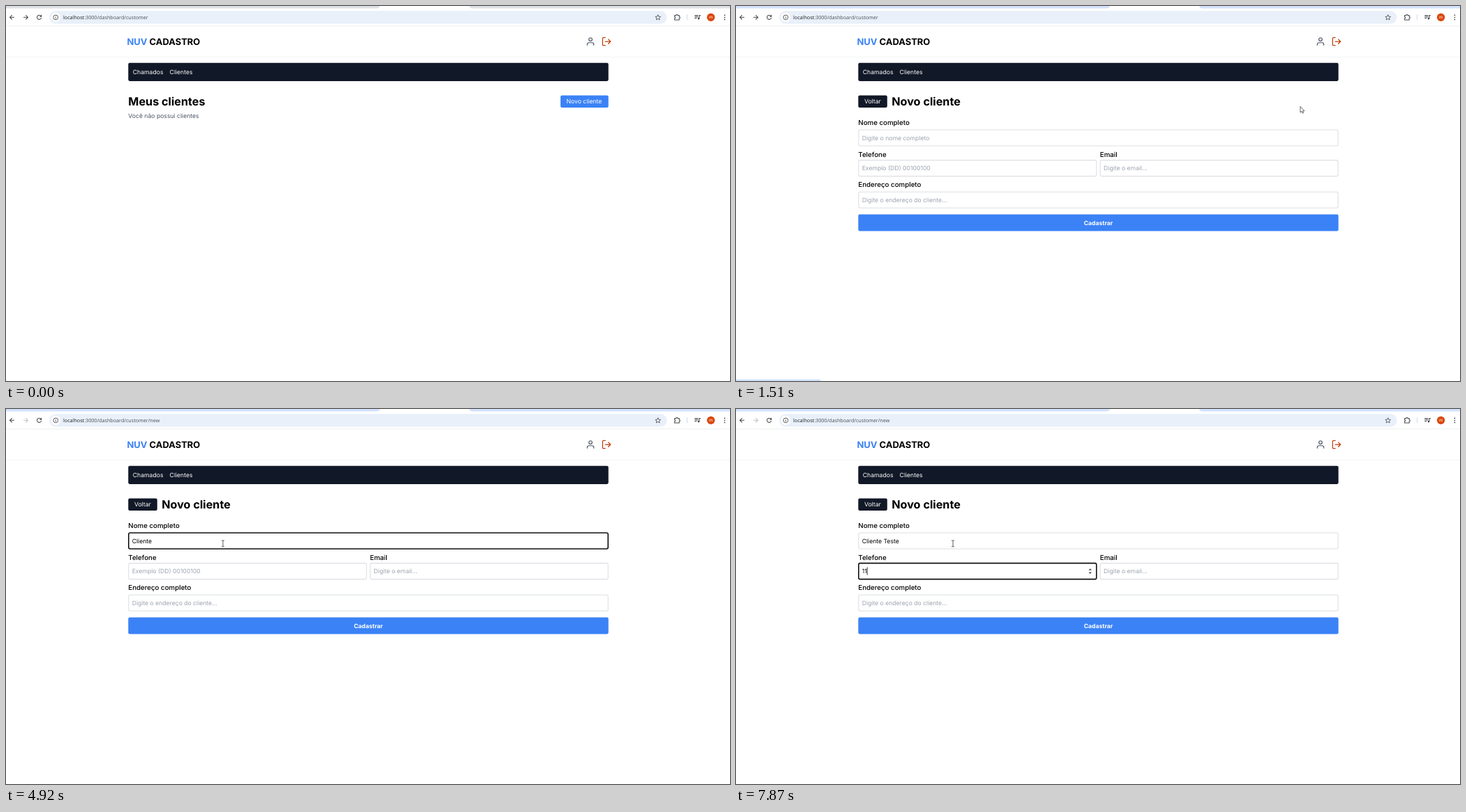
Write an HTML page that moves like this. It is 1038x539 px and loops after 8000 ms.

```html
<!DOCTYPE html>
<html lang="pt-BR">
<head>
<meta charset="utf-8">
<title>Novo cliente</title>
<style>
  html, body { margin: 0; width: 100%; height: 100%; overflow: hidden; background: #fff; }
  svg { display: block; width: 1038px; height: 539px; }
  text { font: 8.65px Inter, sans-serif; white-space: pre; text-rendering: geometricPrecision; }
  .brand { font-size: 12.97px; font-weight: 700; }
  .title { font-size: 16.22px; font-weight: 700; }
  .label { font-size: 9.73px; font-weight: 500; }
  .url { font: 7.19px "Open Sans", sans-serif; fill: #4a4d51; }
  .hint { fill: #9ca3af; }
  .light { fill: #fff; }
  .dark { fill: #111827; }
  .blue { fill: #3b82f6; }
  .chrome { fill: #dee1e6; }
  .active .chrome { fill: #d3e3fd; }
  .field { fill: #fff; stroke: #dcdfe4; stroke-width: 1.08; }
  .field.focus { stroke: #101010; stroke-width: 1.6; }
  .line { fill: none; stroke: #45484c; stroke-width: 1.05; }
  .feather { fill: none; stroke-width: 2; stroke-linecap: round; stroke-linejoin: round; }
  .pointer { fill: #fff; stroke: #25282c; stroke-width: .7; stroke-linejoin: round; }
  .off { display: none; }
</style>
</head>
<body>
<svg id="stage" viewBox="0 0 1038 539">
  <!-- browser bar -->
  <path class="chrome" d="M0 0H536Q535 3.6 531 3.6H0Z"/>
  <path class="chrome" d="M664 0Q665 3.6 669 3.6H1038V0Z"/>
  <rect x="62" y="7" width="885.5" height="18.6" rx="9.3" fill="#e9f0fa"/>
  <circle cx="71.3" cy="16.3" r="6.8" fill="#fff"/>
  <g class="line">
    <path d="M12 16.2H5.6M8.7 13.1L5.6 16.2L8.7 19.3"/>
    <path id="forward" d="M25 16.2H31.4M28.3 13.1L31.4 16.2L28.3 19.3"/>
    <path d="M50.2 14.6A3.1 3.1 0 1 0 50.6 17M50.7 12.8V15.2H48.3"/>
    <circle cx="71.3" cy="16.3" r="3.4" stroke-width=".9"/>
    <path d="M71.3 15.9V18.2M71.3 14.3V15.1" stroke-width=".9"/>
    <path d="M934.7 12.6L935.8 15.1L938.5 15.4L936.5 17.2L937.1 19.8L934.7 18.4L932.3 19.8L932.9 17.2L930.9 15.4L933.6 15.1Z" stroke-width=".85"/>
    <path d="M958.6 13.4H960.7A1.2 1.2 0 0 1 963.1 13.4H965.2V15.4A1.2 1.2 0 0 1 965.2 17.8V20H958.6V17.8A1.2 1.2 0 0 0 958.6 15.4Z"/>
    <path d="M987.3 13.6H992.3M987.3 15.7H992.3M987.3 17.8H990.2M993.9 18V13.6H995.8"/>
    <path d="M976.5 12.2V20.2" stroke="#cddcf3"/>
  </g>
  <circle cx="993" cy="18.1" r="1.3" fill="#45484c"/>
  <circle cx="1010.6" cy="16.2" r="5.7" fill="#d9480f"/>
  <text x="1010.6" y="18.2" text-anchor="middle" fill="#fff" style="font-size:6px">m</text>
  <g fill="#45484c">
    <circle cx="1030.4" cy="13.2" r=".85"/><circle cx="1030.4" cy="16.3" r=".85"/><circle cx="1030.4" cy="19.4" r=".85"/>
  </g>
  <text class="url" x="82" y="18.9"><tspan fill="#1f1f1f">localhost</tspan>:3000/dashboard/customer<tspan id="urlTail">/new</tspan></text>
  <path d="M0 28.7H1038" stroke="#e8eaed" stroke-width=".8"/>

  <!-- page header -->
  <text class="brand" x="173.4" y="55.6"><tspan class="blue">NUV</tspan> CADASTRO</text>
  <g class="feather" stroke="#4b5563" transform="translate(831 44) scale(.585)">
    <path d="M20 21v-2a4 4 0 0 0-4-4H8a4 4 0 0 0-4 4v2"/><circle cx="12" cy="7" r="4"/>
  </g>
  <g class="feather" stroke="#c2410c" transform="translate(853.5 43.5) scale(.63)">
    <path d="M9 21H5a2 2 0 0 1-2-2V5a2 2 0 0 1 2-2h4M16 17l5-5-5-5M21 12H9"/>
  </g>
  <path d="M0 73.3H1038" stroke="#f1f2f4" stroke-width=".9"/>
  <rect class="dark" x="175.3" y="81.7" width="688.4" height="26.2" rx="2.1"/>
  <text class="light" x="181.8" y="98.1">Chamados</text>
  <text class="light" x="234.6" y="98.1">Clientes</text>

  <!-- customer list -->
  <g id="list">
    <text class="title" x="175.3" y="143.3">Meus clientes</text>
    <text x="175.3" y="161.1" fill="#4b5563">Você não possui clientes</text>
    <rect class="blue" x="795" y="128.4" width="68.7" height="17.6" rx="2.1"/>
    <text class="light" x="803.6" y="140.4">Novo cliente</text>
  </g>

  <!-- new customer form -->
  <g id="form">
    <rect class="dark" x="175.3" y="128.4" width="41.5" height="17.6" rx="2.1"/>
    <text class="light" x="183.9" y="140.4">Voltar</text>
    <text class="title" x="223.2" y="143.3">Novo cliente</text>
    <text class="label" x="175.3" y="171">Nome completo</text>
    <rect id="nameField" class="field" x="175.8" y="178" width="687.4" height="23" rx="2.2"/>
    <text id="nameHint" class="hint" x="180.7" y="192.6">Digite o nome completo</text>
    <text id="nameText" x="180.7" y="192.6"></text>
    <text class="label" x="175.3" y="216.7">Telefone</text>
    <rect id="phoneField" class="field" x="175.8" y="221.6" width="341" height="23" rx="2.2"/>
    <text id="phoneHint" class="hint" x="180.7" y="236.2">Exemplo (DD) 00100100</text>
    <text id="phoneText" x="180.7" y="236.2"></text>
    <path id="spinner" d="M505.6 231.7L507.8 229.2L510 231.7ZM505.6 234.6L507.8 237.1L510 234.6Z" fill="#444"/>
    <text class="label" x="521.8" y="216.7">Email</text>
    <rect class="field" x="522.2" y="221.6" width="341" height="23" rx="2.2"/>
    <text class="hint" x="527.1" y="236.2">Digite o email...</text>
    <text class="label" x="175.3" y="260.4">Endereço completo</text>
    <rect class="field" x="175.8" y="267.3" width="687.4" height="23" rx="2.2"/>
    <text class="hint" x="180.7" y="282">Digite o endereço do cliente...</text>
    <rect class="blue" x="175.3" y="299.6" width="688.4" height="23.8" rx="2.1"/>
    <text class="light" x="519.5" y="314.6" text-anchor="middle" font-weight="700" style="font-weight:700">Cadastrar</text>
    <rect id="caret" width=".9" fill="#222"/>
  </g>

  <path id="status" d="M0 536.4H119Q122 536.4 122 539H0Z" fill="#d3e3fd"/>

  <g id="cursor">
    <circle id="click" r="6.2" fill="#fff23c" fill-opacity=".75"/>
    <path id="arrow" class="pointer" d="M0 0V8.7L2 6.9L3.3 9.8L4.7 9.2L3.5 6.4H6Z"/>
    <path id="hand" class="pointer" d="M-1 1a1 1 0 0 1 2 0v3.6q2-.6 2 .6q2-.4 2 .8q1.3-.1 1.3 1.2v2.4q0 1.6-1 3.4H.2L-3.4 8.4q-.4-1.2 1-1L-1 8.6Z"/>
    <path id="beam" d="M-2 -4.4H-.6L0 -4L.6 -4.4H2M0 -4V4M-2 4.4H-.6L0 4L.6 4.4H2" fill="none" stroke="#333" stroke-width=".8"/>
  </g>
</svg>

<script>
  const LOOP = 8000, STEP = 68.2, BLINK = 530;
  const CLICK = 1230, FORM = 1510, ROUTE = 1570, FOCUS_NAME = 2320, FOCUS_PHONE = 6530;
  const el = id => document.getElementById(id);
  const show = (id, on) => el(id).classList.toggle('off', !on);

  const fields = [
    { id: 'name', value: 'Cliente Teste', from: FOCUS_NAME, to: FOCUS_PHONE, blinkFrom: FOCUS_NAME, top: 184, height: 11.2,
      keys: [3250, 3510, 3640, 3840, 3910, 4110, 4180, 4390, 5520, 5720, 5920, 6060, 6130] },
    { id: 'phone', value: '11', from: FOCUS_PHONE, to: LOOP, blinkFrom: 6480, top: 227.4, height: 11.2,
      keys: [7740, 7870] }
  ];

  // time, x, y of the pointer tip
  const toButton = [[270, 1000, 511], [400, 962, 440], [610, 883, 300], [820, 800, 172], [900, 793, 154], [1020, 809.5, 144.8]];
  const toInput = [[1510, 809, 144.4], [1640, 780, 150], [1850, 590, 188], [2050, 400, 226], [2190, 353, 233]];

  function along(path, t) {
    const start = path[0][0];
    t = start + Math.floor((t - start) / STEP + .02) * STEP;
    const i = path.findIndex(p => p[0] > t + 1);
    if (i < 0) return path[path.length - 1].slice(1);
    const [a, b] = [path[i - 1], path[i]];
    const k = (t - a[0]) / (b[0] - a[0]);
    return [a[1] + (b[1] - a[1]) * k, a[2] + (b[2] - a[2]) * k];
  }

  function pointerShape(x, y, t) {
    if (t < FORM) return x >= 795 && y <= 146 ? 'hand' : 'arrow';
    const overInput = (y > 177 && y < 202) || (y > 221 && y < 245);
    return overInput ? 'beam' : 'arrow';
  }

  function drawPointer(t) {
    show('cursor', t >= 270);
    if (t < 270) return;
    const [x, y] = t >= FOCUS_NAME ? [311, 193.4] : along(t < FORM ? toButton : toInput, t);
    el('cursor').setAttribute('transform', `translate(${x} ${y})`);
    const shape = pointerShape(x, y, t);
    for (const id of ['arrow', 'hand', 'beam']) show(id, id === shape);
    const pressed = start => t >= start && t < start + 130;
    show('click', pressed(CLICK) || pressed(FOCUS_NAME));
  }

  function drawField(f, t) {
    const typed = f.keys.filter(k => k <= t).length;
    const focused = t >= f.from && t < f.to;
    const text = el(f.id + 'Text');
    text.textContent = f.value.slice(0, typed);
    show(f.id + 'Hint', !typed);
    el(f.id + 'Field').classList.toggle('focus', focused);
    if (!focused) return;
    const last = typed ? f.keys[typed - 1] : f.blinkFrom;
    const caret = el('caret');
    caret.setAttribute('x', 180.7 + (typed ? text.getComputedTextLength() : 0));
    caret.setAttribute('y', f.top);
    caret.setAttribute('height', f.height);
    show('caret', Math.floor((t - last) / BLINK) % 2 === 0);
  }

  function draw(t) {
    el('stage').classList.toggle('active', t >= CLICK);
    show('status', t >= CLICK && t < 1640);
    show('list', t < FORM);
    show('form', t >= FORM);
    show('urlTail', t >= ROUTE);
    el('forward').style.stroke = t >= ROUTE ? '#bfc1c4' : '';
    show('spinner', t >= FOCUS_PHONE);
    show('caret', false);
    fields.forEach(f => drawField(f, t));
    drawPointer(t);
  }

  const begin = performance.now();
  function tick() {
    draw((performance.now() - begin) % LOOP);
    requestAnimationFrame(tick);
  }
  tick();
</script>
</body>
</html>
```
